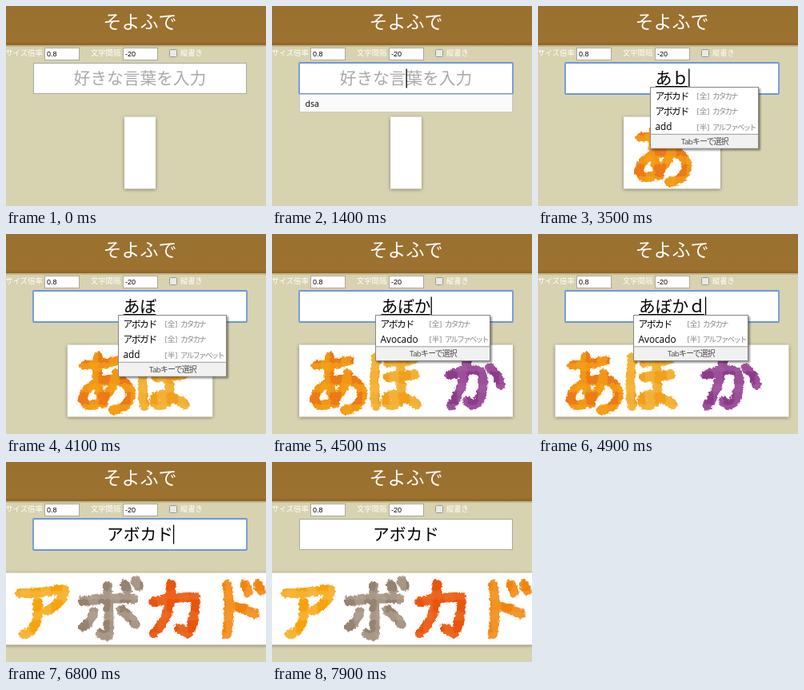
Write an HTML page that moves like this. It is 325 px wide and 250 px high and loops after 8.1 s.

```html
<!DOCTYPE html>
<html lang="ja">
<head>
<meta charset="utf-8">
<title>そよふで</title>
<style>
html, body { margin: 0; width: 100%; height: 100%; overflow: hidden; background: #d7d2b0; }
svg { display: block; width: 325px; height: 250px; font-family: "Noto Sans CJK JP", "Noto Sans CJK", sans-serif; }
.label { font-size: 9.3px; font-weight: 500; fill: #fff; }
.num { font: 9px "Liberation Sans", sans-serif; }
.big { font-size: 20.7px; text-anchor: middle; }
.ui { font-family: "Open Sans", "Noto Sans CJK JP", "Noto Sans CJK", sans-serif; }
.card { fill: #fff; filter: drop-shadow(0 1px 2px #0006); }
.popup { fill: #fff; stroke: #858585; filter: drop-shadow(2px 2px 1px #0006); }
.ink path { fill: none; stroke-width: 12; stroke-linecap: round; stroke-linejoin: round; }
</style>
</head>
<body>
<svg viewBox="0 0 325 250">
  <defs>
    <linearGradient id="wood" x2="0" y2="1">
      <stop stop-color="#99702f"/><stop offset=".9" stop-color="#9d7230"/><stop offset="1" stop-color="#8c6529"/>
    </linearGradient>
    <filter id="rough" x="-20%" y="-20%" width="140%" height="140%">
      <feTurbulence baseFrequency=".16" numOctaves="2" seed="4"/>
      <feDisplacementMap in="SourceGraphic" scale="4" xChannelSelector="R" yChannelSelector="G"/>
    </filter>
    <g id="patterns"></g>
  </defs>
  <rect width="325" height="250" fill="#d7d2b0"/>
  <rect y="49" width="325" height="2" fill="#c2b58a"/>
  <rect width="325" height="49" fill="url(#wood)"/>
  <text x="167.5" y="28" font-size="23" text-anchor="middle" fill="#fff">そよふで</text>
  <g class="label">
    <text x="-.5" y="61.5">サイズ倍率</text>
    <text x="106" y="61.5">文字間隔</text>
    <text x="218" y="61.5">縦書き</text>
  </g>
  <g fill="#fff" stroke="#a9a9a0">
    <rect x="48.5" y="52.5" width="43" height="15"/>
    <rect x="146.5" y="52.5" width="43" height="15"/>
    <rect x="204.5" y="54.5" width="9" height="9" rx="1" fill="#e9e9e6" stroke="#999"/>
  </g>
  <text class="num" x="51" y="63">0.8</text>
  <text class="num" x="149" y="63">-20</text>
  <g id="live"></g>
</svg>
<script>
const LOOP = 8100, MID = 167.5, EM = 20.7, PITCH = 85.5;

// Brush letters: main colour, second colour, strokes
const letters = {
  あ: ['#ec7a12', '#f6a51a', 'M20 163Q42 163 62 157M37 152C35 175 36 195 44 211M60 174C56 196 40 214 27 213C12 211 18 192 38 184C60 176 78 184 78 199C78 212 66 218 56 219'],
  ぼ: ['#f0a01e', '#f5b840', 'M10 153C7 175 6 195 10 214M25 160L52 157M24 178L58 175M40 160C41 180 42 196 39 206C36 216 20 215 22 206C25 196 45 200 60 212M57 149L59 154M67 147L69 151'],
  か: ['#8c3a8a', '#a45aa2', 'M16 175C34 170 54 162 57 178C59 196 54 212 44 213L38 208M38 152C36 178 28 200 18 214M66 166C74 172 78 180 80 188'],
  ど: ['#f08a14', '#f5a233', 'M30 155C33 165 37 176 40 182M62 170C40 178 18 196 26 210C34 218 52 217 64 214M58 151L61 157M70 148L72 154'],
  ア: ['#f6a30c', '#f8b93f', 'M25 163C45 164 65 160 81 158C80 170 70 180 59 185M47 174C50 195 44 210 30 215'],
  ボ: ['#968270', '#b3a393', 'M18 173Q50 168 82 170M49 154C51 175 51 200 50 217L40 214M32 186Q28 200 19 205M66 184Q76 190 84 202M71 152L74 159M84 147L88 154'],
  カ: ['#e8540c', '#ee6c28', 'M21 174C40 170 60 167 73 168C74 188 70 205 64 213L53 207M43 152C44 180 36 200 21 213'],
  ド: ['#f0850e', '#f49c33', 'M28 153C31 175 30 195 27 215M34 179Q52 183 62 189M50 152L54 162M66 152L70 160']
};

const kata = '[全] カタカナ', alpha = '[半] アルファベット';
const avocado = ['アボカド', kata], avogado = ['アボガド', kata];
const popA = { w: 114, col: 58, rows: [avocado, avogado, ['あの', '']] };
const popB = { w: 136, col: 58, rows: [avocado, avogado, ['add', alpha]] };
const popC = { w: 144, col: 67, rows: [avocado, ['Avocado', alpha]] };

// Each step changes only the listed properties; extra = card room for an unfinished letter
const steps = [
  [0, { text: '', art: '', extra: 0, line: 0 }],
  [500, { focus: 1, caret: 1, history: 1 }],
  [900, { caret: 0 }],
  [1400, { caret: 1 }],
  [1700, { history: 0, pop: popA }],
  [1900, { text: 'あ', art: 'あ', line: 1 }],
  [2100, { caret: 0 }],
  [2600, { text: 'あｂ', extra: 25, caret: 1, pop: popB }],
  [3100, { caret: 0 }],
  [3500, { caret: 1 }],
  [3600, { text: 'あぼ', art: 'あぼ', extra: 0 }],
  [4100, { caret: 0 }],
  [4300, { text: 'あぼｋ', extra: 28, caret: 1, pop: popC }],
  [4500, { text: 'あぼか', art: 'あぼか', extra: 0 }],
  [4900, { text: 'あぼかｄ', extra: 25 }],
  [5000, { text: 'あぼかど', art: 'あぼかど', extra: 0 }],
  [5300, { text: 'アボカド', art: 'アボカド', line: 2, pop: null }],
  [5800, { line: 0 }],
  [6300, { caret: 0 }],
  [6800, { caret: 1 }],
  [7200, { caret: 0 }],
  [7700, { caret: 1 }],
  [7900, { focus: 0, caret: 0 }]
];

const rect = (x, y, w, h, attrs = '') => `<rect x="${x}" y="${y}" width="${w}" height="${h}" ${attrs}/>`;
const text = (x, y, str, attrs = '') => `<text x="${x}" y="${y}" ${attrs}>${str}</text>`;

function drawCard({ art, extra }) {
  const w = art ? 96 + PITCH * (art.length - 1) + extra : 39;
  const left = MID - w / 2;
  const ink = [...art].map((c, i) =>
    `<g transform="translate(${left + i * PITCH})" filter="url(#rough)"><path d="${letters[c][2]}" stroke="url(#p${c})"/></g>`);
  return rect(left, 138.5, w, 90, 'class="card"') + `<g class="ink">${ink.join('')}</g>`;
}

function drawInput({ text: str, focus, caret, line, history }) {
  const half = str.length * EM / 2;
  let out = focus
    ? rect(34, 71, 267, 39, 'fill="#fff" stroke="#6f97dc" stroke-width="1.8" rx="1"')
    : rect(34.5, 71.5, 266, 38, 'fill="#fff" stroke="#a9a9a0"');
  out += str ? text(MID, 97.5, str, 'class="big"') : text(MID, 97.5, '好きな言葉を入力', 'class="big" fill="#a9a9a9"');
  if (line) out += rect(MID - half, 100, half * 2 - 1, line === 2 ? 1.8 : 1);
  if (caret) out += rect(MID + half, 78.5, 1.3, 24);
  if (history) {
    out += rect(34.5, 110.5, 266, 22, 'fill="#fafafa" stroke="#c9c9c4"');
    out += text(41.5, 126, 'dsa', 'class="ui" font-size="10.5"');
  }
  return out;
}

function drawPopup({ pop, text: str }) {
  if (!pop) return '';
  const x = Math.round(MID - (str.length || 1) * EM / 2 - 7) + .5;
  const foot = 102 + pop.rows.length * 19.5;
  let out = rect(x, 101.5, pop.w - 1, foot - 84, 'class="popup"');
  pop.rows.forEach(([word, kind], i) => {
    const y = 116.5 + i * 19.3;
    const tight = /[ァ-ヶ]/.test(word) ? 'letter-spacing="-1.5"' : '';
    out += text(x + 6, y, word, `font-size="11.8" ${tight}`);
    out += text(x + pop.col, y - .5, kind.slice(0, 4), 'font-size="9.5" fill="#888"');
    out += text(x + pop.col + 19.5, y - .5, kind.slice(4), 'font-size="9.5" letter-spacing="-1.8" fill="#888"');
  });
  out += rect(x + .5, foot, pop.w - 2, 17, 'fill="#f1f1f1"') + rect(x, foot - .7, pop.w - 1, 1, 'fill="#999"');
  out += text(x + pop.w / 2, foot + 12, 'Tabキーで選択', 'font-size="9.8" letter-spacing="-.7" text-anchor="middle" fill="#444"');
  return `<g class="ui">${out}</g>`;
}

document.getElementById('patterns').innerHTML = Object.entries(letters).map(([c, [main, second]]) =>
  `<pattern id="p${c}" width="26" height="26" patternUnits="userSpaceOnUse">${rect(0, 0, 26, 26, `fill="${main}"`)}` +
  `<g fill="${second}">${rect(0, 0, 12, 26, 'opacity=".65"')}${rect(0, 4, 26, 11, 'opacity=".65"')}</g></pattern>`).join('');

const live = document.getElementById('live');
let shown = -1;

function frame(now) {
  const t = now % LOOP;
  const past = steps.filter(([at]) => at <= t);
  if (past.length !== shown) {
    shown = past.length;
    const state = Object.assign({}, ...past.map(step => step[1]));
    live.innerHTML = drawCard(state) + drawInput(state) + drawPopup(state);
  }
  requestAnimationFrame(frame);
}
frame(performance.now());
</script>
</body>
</html>
```
